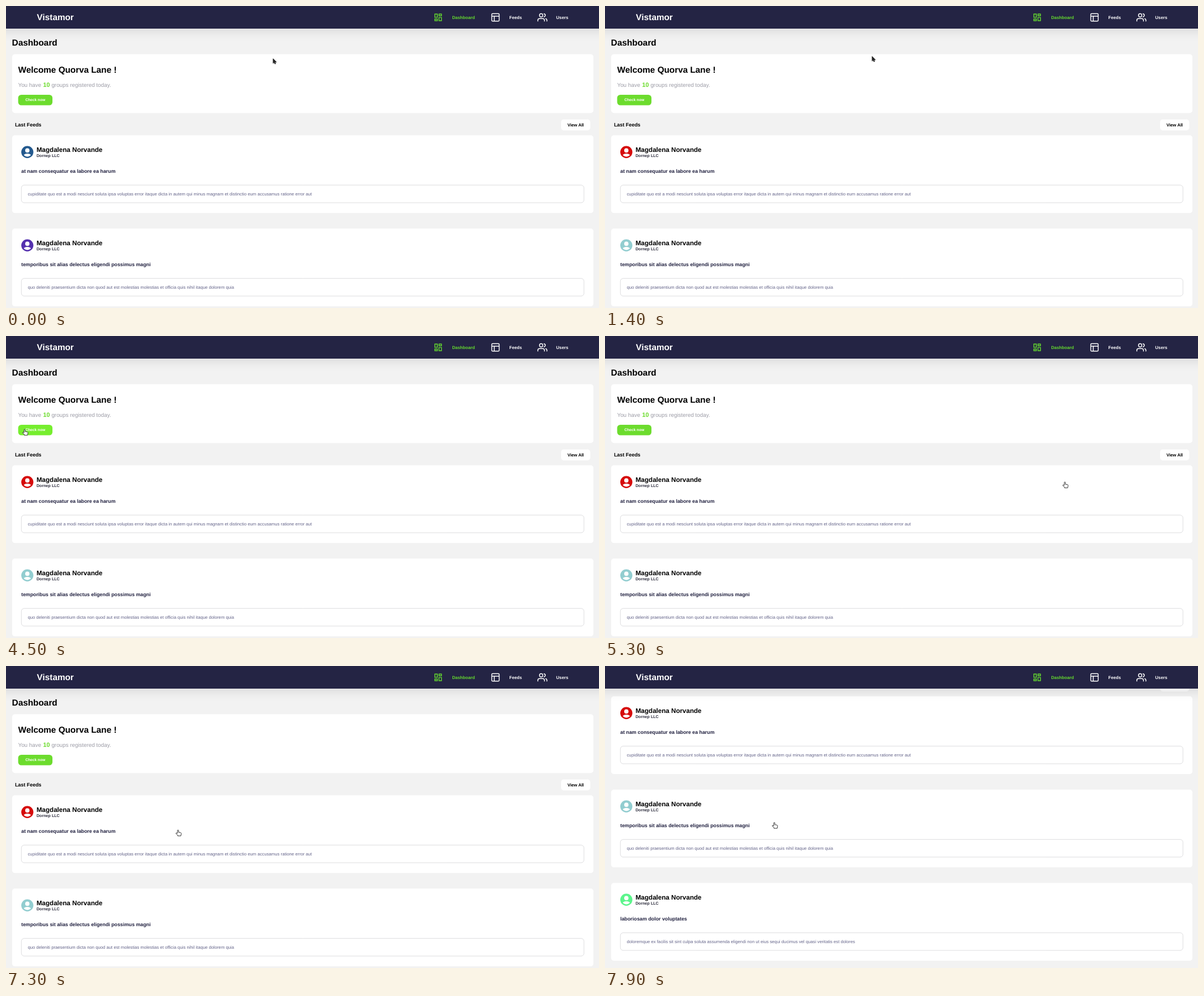
Write an HTML page with a canvas that moves like this. It is 1048 by 534 pixels and loops after 8000 ms.

```html
<!DOCTYPE html>
<html lang="en">
<head>
<meta charset="utf-8">
<title>Dashboard</title>
<style>
html, body { margin: 0; width: 100%; height: 100%; overflow: hidden; background: #f2f2f2; }
canvas { display: block; width: 1048px; height: 534px; }
</style>
</head>
<body>
<canvas id="stage" width="1048" height="534"></canvas>
<script>
const ctx = document.getElementById('stage').getContext('2d');
const WIDTH = 1048, HEIGHT = 534, LOOP = 8000, STEP = 100, TAU = Math.PI * 2;
const GREEN = '#6cdc2d', NAVY = '#242444', PAGE = '#f2f2f2';
const MARGIN = 10.8, CARD_WIDTH = WIDTH - 2 * MARGIN + 1;
const FEED_TOP = 228.6, FEED_PITCH = 165, FEED_HEIGHT = 137.5;
const CHECK = [21.5, 157, 60.6, 18.6], VIEW = [981, 200.4, 51.5, 19.6];

const FEEDS = [
  { title: 'at nam consequatur ea labore ea harum', colors: ['#23598e', '#d60b0b'],
    body: 'cupiditate quo est a modi nesciunt soluta ipsa voluptas error itaque dicta in autem qui minus magnam et distinctio eum accusamus ratione error aut' },
  { title: 'temporibus sit alias delectus eligendi possimus magni', colors: ['#5430ae', '#92cdd0'],
    body: 'quo deleniti praesentium dicta non quod aut est molestias molestias et officia quis nihil itaque dolorem quia' },
  { title: 'laboriosam dolor voluptates', colors: ['#5cf58c', '#5cf58c'],
    body: 'doloremque ex facilis sit sint culpa soluta assumenda eligendi non ut eius sequi ducimus vel quasi veritatis est dolores' }
];

// Pointer stops, joined by eased moves
const STOPS = [
  { t: 0, x: 472, y: 93 }, { t: 1300, x: 472, y: 93 }, { t: 1400, x: 472, y: 89 },
  { t: 1800, x: 156, y: 2 }, { t: 2200, x: 406, y: 14 }, { t: 2700, x: 76, y: 116 },
  { t: 3000, x: 126, y: 132 }, { t: 3400, x: 573, y: 91 }, { t: 4000, x: 70, y: 165 },
  { t: 4500, x: 33, y: 165 }, { t: 5500, x: 895, y: 268 }, { t: 6100, x: 992, y: 208 },
  { t: 6600, x: 995, y: 209 }, { t: 7300, x: 304, y: 290 }, { t: LOOP, x: 299, y: 276 }
];

const lerp = (a, b, u) => a + (b - a) * u;
const ease = u => (1 - Math.cos(Math.PI * u)) / 2;
const inside = (p, [x, y, w, h]) => p.x >= x && p.x < x + w && p.y >= y && p.y < y + h;
const feedBox = i => [MARGIN, FEED_TOP + FEED_PITCH * i, CARD_WIDTH, FEED_HEIGHT];

function text(str, x, y, size, color, weight = 'bold', align = 'left') {
  ctx.font = `${weight} ${size}px "Liberation Sans", Arial, sans-serif`;
  ctx.textRendering = 'geometricPrecision';
  ctx.textAlign = align;
  ctx.fillStyle = color;
  ctx.fillText(str, x, y);
}

function box(rect, radius, fill, border) {
  ctx.beginPath();
  ctx.roundRect(...rect, radius);
  if (fill) { ctx.fillStyle = fill; ctx.fill(); }
  if (border) { ctx.strokeStyle = border; ctx.lineWidth = 0.6; ctx.stroke(); }
}

function disc(x, y, r, fill) {
  ctx.beginPath();
  ctx.arc(x, y, r, 0, TAU);
  ctx.fillStyle = fill;
  ctx.fill();
}

function at(x, y, scale, draw) {
  ctx.save();
  ctx.translate(x, y);
  ctx.scale(scale, scale);
  draw();
  ctx.restore();
}

// Icon outlines on a 24 unit grid
function tiles() {
  for (const [x, y, h] of [[4, 4, 8], [14, 4, 4]]) {
    ctx.rect(x, y, 6, h);
    ctx.rect(18 - x, 24 - y - h, 6, h);
  }
}

function layout() {
  ctx.roundRect(3, 3, 18, 18, 2);
  ctx.moveTo(3, 9);
  ctx.lineTo(21, 9);
  ctx.moveTo(9, 9);
  ctx.lineTo(9, 21);
}

function people() {
  ctx.arc(9, 7, 4, 0, TAU);
  ctx.moveTo(1, 21);
  ctx.arcTo(1, 15, 5, 15, 4);
  ctx.arcTo(17, 15, 17, 19, 4);
  ctx.lineTo(17, 21);
  ctx.moveTo(16, 3.1);
  ctx.arc(15, 7, 4, -1.3, 1.3);
  ctx.moveTo(20, 15.1);
  ctx.arcTo(23, 16, 23, 19, 3.5);
  ctx.lineTo(23, 21);
}

function navItem(icon, iconX, label, labelX, color) {
  at(iconX, 11.4, 0.728, () => {
    ctx.strokeStyle = color;
    ctx.lineWidth = 2;
    ctx.lineCap = 'round';
    ctx.beginPath();
    icon();
    ctx.stroke();
  });
  text(label, labelX, 23, 7.7, color);
}

function header(loaded) {
  ctx.save();
  ctx.shadowColor = 'rgba(0,0,0,0.1)';
  ctx.shadowBlur = 20;
  ctx.shadowOffsetY = 5;
  ctx.fillStyle = NAVY;
  ctx.fillRect(-20, -20, WIDTH + 40, 60);
  ctx.restore();
  if (!loaded) return;
  text('Vistamor', 54.6, 25, 15.3, '#fff');
  navItem(tiles, 755, 'Dashboard', 788.5, '#64d92f');
  navItem(layout, 856.3, 'Feeds', 889.5, '#fff');
  navItem(people, 939.2, 'Users', 972.3, '#fff');
}

function overview(count, overCheck, overView) {
  text('Dashboard', 10.6, 70, 15.35, '#000');
  box([MARGIN, 85.3, CARD_WIDTH, 104], 5, '#fff');
  text('Welcome Quorva Lane !', 21.5, 118, 15.3, '#000');
  text('You have', 21.5, 143, 9.83, '#9c9ca6', 'normal');
  text(count, 65.4, 143, 10.95, GREEN);
  text('groups registered today.', 80.4, 143, 9.83, '#9c9ca6', 'normal');
  box(CHECK, 5.5, overCheck ? '#76ee2e' : GREEN);
  text('Check now', 51.8, 168, 6.68, '#fff', 'bold', 'center');
  text('Last Feeds', 15.9, 213, 8.95, '#000');
  box(VIEW, 5, overView ? '#b8de9b' : '#fff');
  text('View All', 1006.7, 213, 7.7, overView ? '#667c56' : '#000', 'bold', 'center');
}

function avatar(x, y, color) {
  at(x, y, 10.7, () => {
    disc(0, 0, 1, color);
    disc(0, -0.26, 0.355, '#fff');
    ctx.beginPath();
    ctx.arc(0, 0, 0.775, 0, TAU);
    ctx.clip();
    ctx.beginPath();
    ctx.ellipse(0, 0.65, 0.65, 0.39, 0, 0, TAU);
    ctx.fill();
  });
}

function feedCard(feed, i, visit) {
  const card = feedBox(i), y = card[1];
  box(card, 5, '#fff');
  avatar(37.7, y + 29.6, feed.colors[visit]);
  text('Magdalena Norvande', 53.9, y + 29.4, 11.6, '#000');
  text('Dornep LLC', 53.9, y + 38.6, 7.15, '#2c2c3c');
  text(feed.title, 27, y + 66.6, 8.82, '#20203f');
  box([27.2, y + 88.1, 994.2, 31.2], 5, null, '#c6c6ca');
  text(feed.body, 38.5, y + 106.2, 7.725, '#65658a', 'normal');
}

function statusBubble() {
  box([-4, 525, 356, 16], 3, '#dee1e6');
  text('Waiting for server...', 4, 532, 6.5, '#5f6368', 'normal');
}

function pointerAt(t) {
  const i = STOPS.findIndex(stop => stop.t > t);
  const a = STOPS[i - 1], b = STOPS[i];
  const u = ease((t - a.t) / (b.t - a.t));
  return { x: lerp(a.x, b.x, u), y: lerp(a.y, b.y, u) };
}

function outlined(path, fill, line) {
  const shape = new Path2D(path);
  ctx.lineJoin = 'round';
  ctx.lineWidth = 0.9;
  ctx.fillStyle = fill;
  ctx.strokeStyle = line;
  ctx.fill(shape);
  ctx.stroke(shape);
}

const arrow = () => outlined('M0 0V8.4L1.9 6.7 3.2 9.6 4.6 9 3.3 6.2H6z', '#222', '#333');
const hand = () => outlined('M-1 6V1a1 1 0 0 1 2 0V4L4.5 4.5Q6 5 5.7 6.5L5 10.4H-.6V9L-3.6 6.4Q-3.8 4.7-2.4 5.2z', '#fff', '#222');
const beam = () => outlined('M-1.8-5H1.8M0-5V5M-1.8 5H1.8', '#333', '#333');

function drawPointer(p, scroll, overButton) {
  const page = { x: p.x, y: p.y + scroll };
  const onFeed = FEEDS.some((_, i) => inside(page, feedBox(i)));
  const onText = inside(page, [21, 103, 175, 21]) || inside(page, [21, 129, 165, 19]);
  at(p.x, p.y, 1, overButton || onFeed ? hand : onText ? beam : arrow);
}

function render(t) {
  const pointer = pointerAt(t);
  const u = Math.min(1, Math.max(0, (t - 7400) / 500));
  const scroll = 175 * (1 - (1 - u) ** 2);
  const overCheck = inside(pointer, CHECK);
  const overView = scroll === 0 && inside(pointer, VIEW);
  const blank = t >= 500 && t < 600;
  const feedsReady = t < 500 || t >= 800;

  ctx.fillStyle = PAGE;
  ctx.fillRect(0, 0, WIDTH, HEIGHT);
  ctx.save();
  ctx.translate(0, -scroll);
  if (!blank) overview(t >= 600 && t < 700 ? '0' : '10', overCheck, overView);
  if (feedsReady) FEEDS.forEach((feed, i) => feedCard(feed, i, t < 500 ? 0 : 1));
  ctx.restore();
  header(!blank);
  if (t >= 100 && t < 900) statusBubble();
  drawPointer(pointer, scroll, overCheck || overView);
}

const start = performance.now();
function tick() {
  const t = (performance.now() - start) % LOOP;
  render(Math.floor(t / STEP) * STEP);
  requestAnimationFrame(tick);
}
tick();
</script>
</body>
</html>
```
